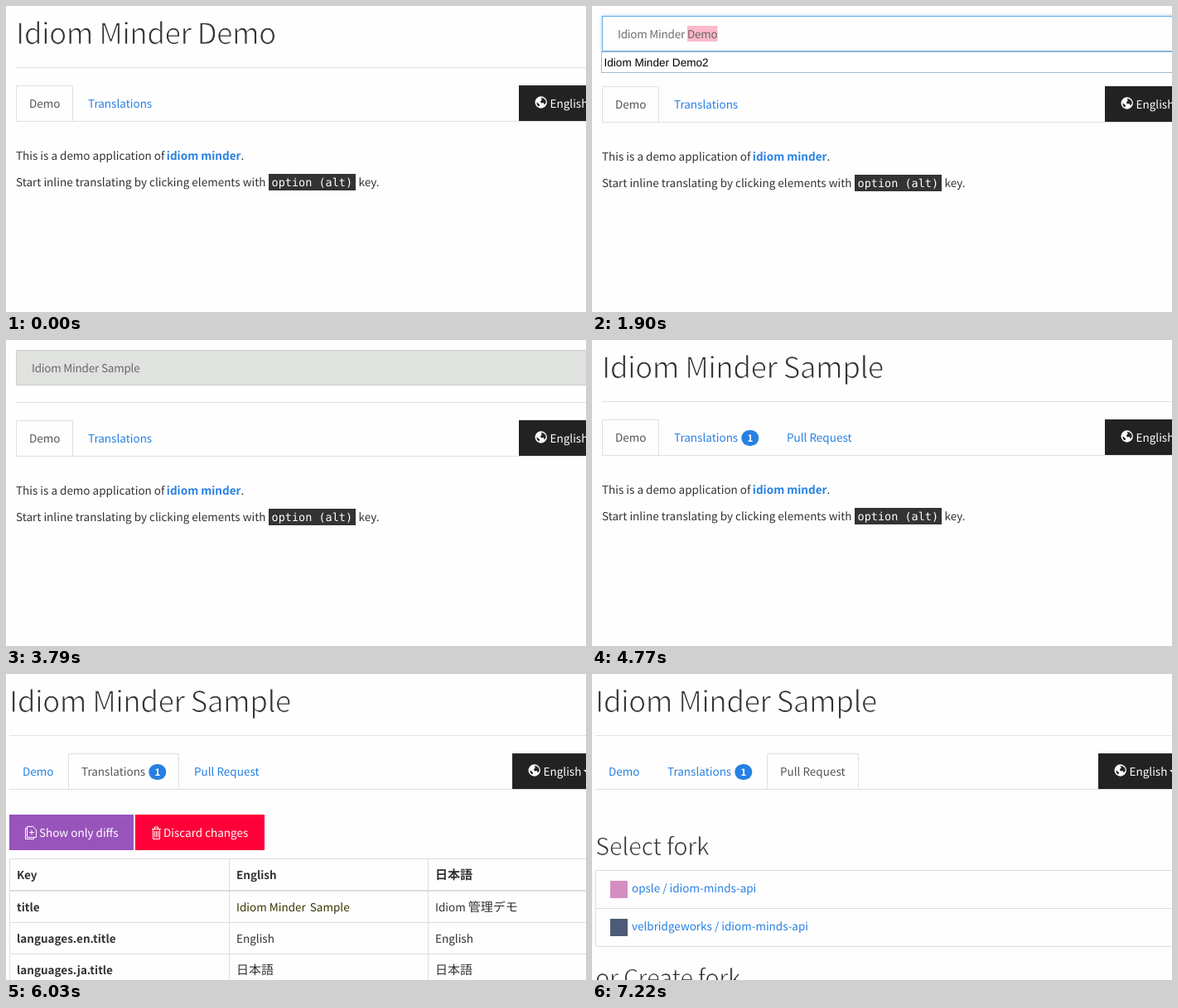
Write an HTML page that moves like this. It is 700 by 370 pixels and loops after 8000 ms.

```html
<!DOCTYPE html>
<html lang="ja">
<head>
<meta charset="utf-8">
<title>Inline translation</title>
<style>
  html, body { margin: 0; width: 100%; height: 100%; overflow: hidden; background: #fefefe; }
  svg { display: block; width: 700px; height: 370px; }
  text {
    font-family: "Noto Sans CJK JP", "Noto Sans CJK", "Noto Sans", sans-serif;
    font-size: 13.51px; fill: #333; white-space: pre; text-rendering: geometricPrecision;
  }
  .h1 { font-size: 35.3px; font-weight: 300; }
  .h2 { font-size: 28.9px; font-weight: 300; }
  .input { font-weight: 300; fill: #555; }
  .bold { font-weight: 700; }
  .link { fill: #2780e3; }
  .hover { fill: #165ba8; }
  .tab { fill: #555; }
  .white { fill: #fff; }
  .edited { fill: #3a3800; }
  .ja { font-size: 15px; }
  .code { font: 13.5px "DejaVu Sans Mono", monospace; fill: #fff; }
  .menu { font: 13.6px "Liberation Sans", Arial, sans-serif; fill: #000; }
  .badge { font-size: 11.6px; font-weight: 700; fill: #fff; text-anchor: middle; }
  /* used only when the font has no light weight */
  .thin .h1, .thin .h2 { stroke: #fefefe; stroke-width: .03em; letter-spacing: -.0175em; }
  .thin .input { fill-opacity: .85; letter-spacing: -.0175em; }
</style>
</head>
<body>
<svg id="stage" viewBox="0 0 700 370"></svg>
<script>
const LOOP = 8000;
const NAME = 'Idiom Minder';
const LINE = '#e0e0e0', HOVER = '#e0e2df', BLUE = '#2780e3';
const KEYS = [2320, 2600, 2810, 3020, 3160, 3300];

const stage = document.getElementById('stage');
const pen = document.createElement('canvas').getContext('2d');
const measure = (s, weight) => {
  pen.font = `${weight} 13.51px "Noto Sans CJK JP", "Noto Sans CJK", "Noto Sans", sans-serif`;
  return pen.measureText(s).width;
};
if (measure(NAME, 300) === measure(NAME, 400)) stage.classList.add('thin');

const text = (x, y, s, cls = '') => `<text x="${x}" y="${y}" class="${cls}">${s}</text>`;
const rect = (x, y, w, h, fill, extra = '') =>
  `<rect x="${x}" y="${y}" width="${w}" height="${h}" fill="${fill}" ${extra}/>`;
const path = (d, stroke, fill = 'none') => `<path d="${d}" stroke="${stroke}" fill="${fill}"/>`;

const clamp = v => Math.max(0, Math.min(1, v));
const ease = (t, from, to) => {
  const p = clamp((t - from) / (to - from));
  return p * p * (3 - 2 * p);
};
const mix = (a, b, p) => `rgb(${a.map((v, i) => Math.round(v + (b[i] - v) * p))})`;

const heading = (x, word) => text(x, 46, NAME, 'h1') + text(x + 218.4, 46, word, 'h1');
const rule = x => path(`M${x} 74.5H700`, LINE);

function globe(x, y) {
  return `<g transform="translate(${x} ${y})"><circle r="7.2" fill="#fff"/>
    <path fill="#222" d="M0 -5.5L3 -5L5.5 -2.5L6 .5L4 3L3 .5L.5 1L-1 -1L1 -3Z
      M-5.5 0L-3.5 1L-1.5 3L-2.5 5L-4.5 3.5Z"/></g>`;
}

// active and hover are tab indexes, -1 for none
function nav(x, active, hover, edited) {
  const tabs = [[0, 69, 'Demo'], [71, 134, 'Translations'], [207, 111, 'Pull Request']];
  const [ax, aw] = tabs[active];
  let out = hover >= 0 ? rect(x + tabs[hover][0], 96, tabs[hover][1], 43, HOVER) : '';
  out += path(`M${x} 139.5H700M${x + ax + .5} 139V96.5h${aw - 1}V139`, LINE);
  tabs.slice(0, edited ? 3 : 2).forEach(([dx, , label], i) => {
    out += text(x + dx + 16, 123, label, i === active ? 'tab' : i === hover ? 'hover' : 'link');
  });
  if (edited) {
    out += rect(x + 168.3, 109, 21, 19, BLUE, 'rx="9.5"') + text(x + 178.8, 123, '1', 'badge');
  }
  return out + rect(x + 607, 96, 100, 43, '#222') + globe(x + 633.7, 116.5) +
    text(x + 644.5, 123, 'English', 'white') +
    path(`M${x + 693} 116h8l-4 4z`, 'none', '#fff');
}

function intro() {
  return text(12, 186, 'This is a demo application of ') +
    `<text x="193.8" y="186"><tspan class="bold link">${NAME.toLowerCase()}</tspan>.</text>` +
    text(12, 218, 'Start inline translating by clicking elements with ') +
    rect(317, 203, 105, 20, '#333') + text(320.5, 218, 'option (alt)', 'code') +
    text(425.5, 218, 'key.');
}

function field(t) {
  const typed = KEYS.filter(k => t >= k).length;
  const word = typed ? 'Sample'.slice(0, typed) : 'Demo';
  const focus = ease(t, 1660, 1830) * (1 - ease(t, 3630, 3790));
  const done = t >= 3650;
  let out = '';
  if (focus > 0) {
    out += `<filter id="blur" x="-5%" y="-30%" width="110%" height="160%">
      <feGaussianBlur stdDeviation="2.3"/></filter>` +
      rect(12, 12, 720, 43, '#66afe9', `opacity="${.6 * focus}" filter="url(#blur)"`);
  }
  out += rect(12.5, 12.5, 720, 42, done ? HOVER : '#fefefe',
    `stroke="${mix([204, 204, 204], [102, 175, 233], focus)}"`);
  if (t >= 1830 && !typed) out += rect(115, 24, 36.5, 19, '#fbb9cb');
  out += text(31, 39, NAME, 'input') + text(115, 39, word, 'input');
  if (typed && !done) {
    out += rect(Math.round(115 + measure(word, 300)), 24, 1, 19, '#000');
  }
  if (t >= 1900 && t < 2390) {
    out += rect(11.5, 55.5, 720, 25, '#fff', 'stroke="#a9b8c8"') +
      text(14.5, 73, NAME + ' Demo2', 'menu');
  }
  return out;
}

function table() {
  const cols = [13, 278, 518];
  const rows = [
    ['Key', 'English', '日本語'],
    ['title', '', ''],
    ['languages.en.title', 'English', 'English'],
    ['languages.ja.title', '日本語', '日本語']
  ];
  let out = path('M4.5 370V223.5H700M269.5 223V370M509.5 223V370M4 300.5H700M4 338.5H700', '#ddd') +
    rect(4, 261, 696, 2, '#ddd');
  rows.forEach((row, r) => row.forEach((s, c) => {
    const cls = (r && c ? '' : 'bold') + (s === '日本語' ? ' ja' : '');
    out += text(cols[c], [248, 287, 325, 363][r], s, cls);
  }));
  return out + text(278, 287, NAME, 'edited') + text(366.8, 287, 'Sample', 'edited') +
    `<text x="518" y="287">${NAME.split(' ')[0]} <tspan class="ja">管理デモ</tspan></text>`;
}

function buttons() {
  return rect(4, 170, 150, 43, '#9954bb') + rect(156, 170, 156, 43, '#ff0039') +
    path('M25.5 184.5h7l4 4v9h-11zM25 186.5h-1.5v13h10v-2M28 191.5h6M31 188.5v6', '#fff') +
    path('M176 187.5h11M179.5 187v-2h4v2M177.5 188v11.5h8v-11.5M179.5 190v7.5M181.5 190v7.5M183.5 190v7.5', '#fff') +
    text(40, 197, 'Show only diffs', 'white') + text(190, 197, 'Discard changes', 'white');
}

function forks() {
  return text(4, 219, 'Select fork', 'h2') +
    path('M700 237.5H4.5V329.5H700M4 283.5H700', '#ddd') +
    rect(22, 250, 21, 21, '#d58fc3') + text(48, 264, 'opsle / idiom-minds-api', 'link') +
    rect(22, 296, 21, 21, '#4d5b76') + text(48, 310, 'velbridgeworks / idiom-minds-api', 'link') +
    text(4, 378, 'or Create fork', 'h2');
}

function scene(t) {
  if (t < 500) return heading(12, 'Demo') + rule(12) + nav(12, 0, -1, false) + intro();
  if (t < 4770) {
    return `<g transform="translate(0 1)">${rule(12) + nav(12, 0, -1, false) + intro()}</g>` + field(t);
  }
  if (t < 6030) {
    return heading(12, 'Sample') + rule(12) + nav(12, 0, t >= 5400 ? 1 : -1, true) + intro();
  }
  const top = heading(4, 'Sample') + rule(4);
  if (t < 7220) return top + nav(4, 1, t >= 6310 ? 2 : -1, true) + buttons() + table();
  return top + nav(4, 2, -1, true) + forks();
}

let shown = '';
function render(now) {
  const markup = scene(now % LOOP);
  if (markup !== shown) stage.innerHTML = shown = markup;
}

const start = performance.now();
function tick() {
  render(performance.now() - start);
  requestAnimationFrame(tick);
}
tick();
</script>
</body>
</html>
```
